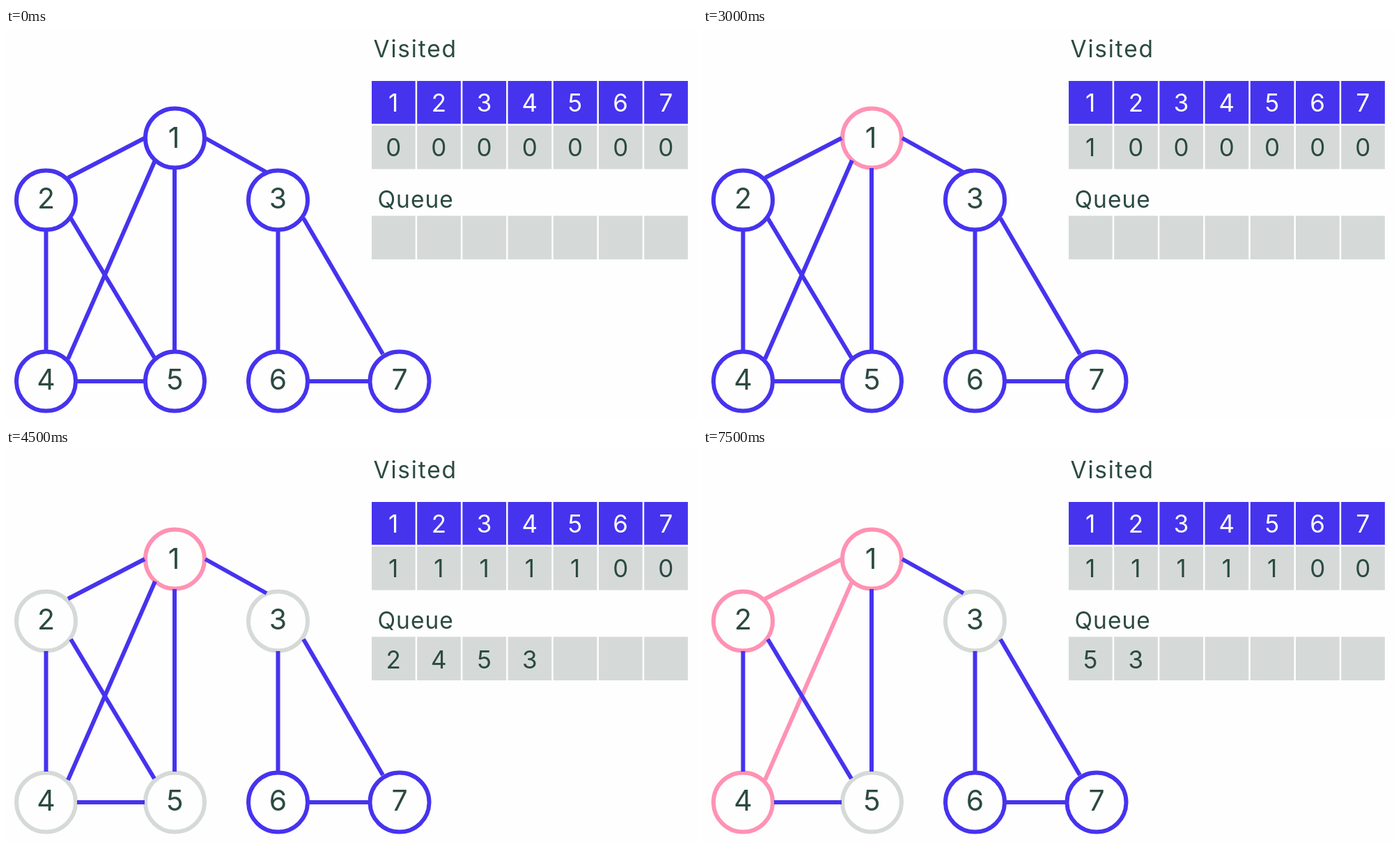
Recreate the animation shown at these times as an HTML page. Size 992 by 564 pixels, loop 8000 ms.

```html
<!DOCTYPE html>
<html lang="en">
<head>
<meta charset="utf-8">
<title>Breadth-first search</title>
<style>
  html, body { margin: 0; width: 100%; height: 100%; overflow: hidden; background: #fefefe; }
  svg { display: block; width: 100vw; height: 100vh; }
  text { font-family: Inter, Roboto, sans-serif; fill: #2b4a42; }
  .node, .edge { stroke-width: 6; }
  .node { fill: #fefefe; }
  .label { font-size: 41px; text-anchor: middle; }
  .digit { font-size: 35px; text-anchor: middle; }
  .head { fill: #fff; }
  .title { font-size: 33.5px; }
</style>
</head>
<body>
<svg id="stage" viewBox="0 0 992 564"></svg>
<script>
const BLUE = '#4633ee', GREY = '#d5dad8', PINK = '#ff92b4';
const STEP = 1500, LOOP = 8000;

const nodes = {
  1: [242.5, 158], 2: [57.5, 247], 3: [390.5, 247], 4: [57.5, 507],
  5: [242.5, 507], 6: [390.5, 507], 7: [565, 507]
};

const edges = {
  '1-2': [199, 158, 89, 215],
  '1-4': [214, 190, 89, 475],
  '1-5': [242, 201, 242, 463],
  '1-3': [286, 158, 374, 207],
  '2-4': [57.5, 290, 57.5, 463],
  '2-5': [93, 273, 213, 473],
  '4-5': [102, 507, 199, 507],
  '3-6': [390.5, 290, 390.5, 463],
  '3-7': [427, 273, 541, 468],
  '6-7': [435, 507, 521, 507]
};

// seen: discovered nodes, done: dequeued nodes, path: traversed edges
const steps = [
  { seen: '', queue: '', done: '', path: [] },
  { seen: '1', queue: '1', done: '', path: [] },
  { seen: '1', queue: '', done: '1', path: [] },
  { seen: '12345', queue: '2453', done: '1', path: [] },
  { seen: '12345', queue: '453', done: '12', path: ['1-2'] },
  { seen: '12345', queue: '53', done: '124', path: ['1-2', '1-4'] }
];

const stage = document.getElementById('stage');

function add(tag, attrs, text = '') {
  const el = document.createElementNS('http://www.w3.org/2000/svg', tag);
  for (const key in attrs) el.setAttribute(key, attrs[key]);
  el.textContent = text;
  return stage.appendChild(el);
}

function addRow(y, fill, height, baseline, extra = '') {
  return Array.from({ length: 7 }, (_, i) => {
    const x = 525 + i * 65.2;
    add('rect', { x, y, width: 62.7, height, fill });
    return add('text', { class: 'digit ' + extra, x: x + 31.2, y: baseline });
  });
}

const rings = {}, lines = {};
for (const id in nodes) {
  const [cx, cy] = nodes[id];
  rings[id] = add('circle', { class: 'node', cx, cy, r: 42.5 });
}
for (const id in edges) {
  const [x1, y1, x2, y2] = edges[id];
  lines[id] = add('line', { class: 'edge', x1, y1, x2, y2 });
}
for (const id in nodes) {
  const [x, y] = nodes[id];
  const top = id === '1';
  add('text', { class: 'label', x: top ? x - 1.5 : x, y: y + (top ? 13.5 : 12) }, id);
}

add('text', { class: 'title', x: 527.5, y: 42, 'letter-spacing': 1.8 }, 'Visited');
add('text', { class: 'title', x: 533.5, y: 258, 'letter-spacing': 1 }, 'Queue');
addRow(76, BLUE, 61.5, 119.5, 'head').forEach((cell, i) => cell.textContent = i + 1);
const visited = addRow(140, GREY, 62.5, 183.5);
const queue = addRow(269.5, GREY, 62.5, 314.5);

function show({ seen, queue: waiting, done, path }) {
  for (const id in rings) {
    const color = done.includes(id) ? PINK : seen.includes(id) ? GREY : BLUE;
    rings[id].setAttribute('stroke', color);
  }
  for (const id in lines) lines[id].setAttribute('stroke', path.includes(id) ? PINK : BLUE);
  visited.forEach((cell, i) => cell.textContent = seen.includes(i + 1) ? 1 : 0);
  queue.forEach((cell, i) => cell.textContent = waiting[i] || '');
}

const start = performance.now();
let current = -1;

function tick() {
  const index = Math.floor(((performance.now() - start) % LOOP) / STEP);
  if (index !== current) show(steps[current = index]);
  requestAnimationFrame(tick);
}
tick();
</script>
</body>
</html>
```
